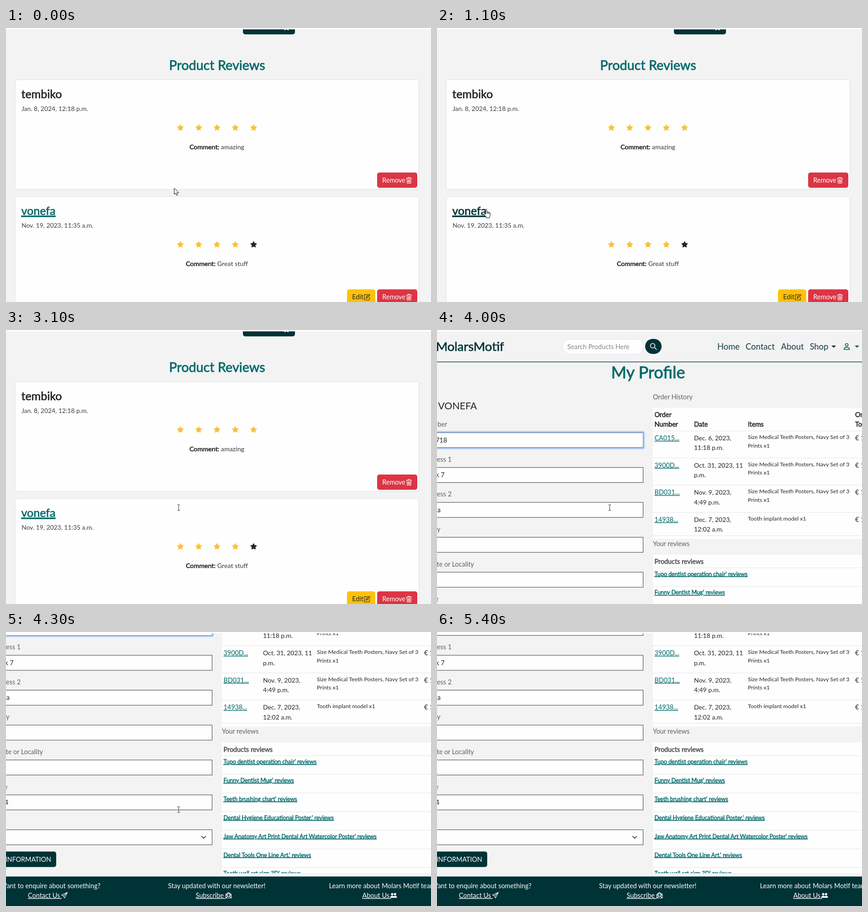
An HTML page for the animation above (5.5 s loop, 931x601 px).

```html
<!DOCTYPE html>
<html lang="en">
<head>
<meta charset="utf-8">
<title>Reviews and profile</title>
<style>
  html, body { margin: 0; width: 100%; height: 100%; overflow: hidden; background: #f3f3f3; }
  svg { display: block; width: 931px; height: 601px; }
  text { font-family: Lato, sans-serif; white-space: pre; }
  .link { text-decoration: underline; }
</style>
</head>
<body>
<svg id="stage" viewBox="0 0 931 601"></svg>
<script>
const DARK = '#003336', TEAL = '#00696a', INK = '#212529', GREY = '#5c6064', LINE = '#e1e3e5';
const BASE = 14.35, DATE = 13.9, SMALL = 12.6, ITEM = 12.35;

const text = (x, y, str, { size = BASE, fill = INK, bold = 0, anchor = 'start', link = false, id = '' } = {}) =>
  `<text x="${x}" y="${y}" font-size="${size}" fill="${fill}" text-anchor="${anchor}"` +
  (bold ? ` stroke="${fill}" stroke-width="${bold}"` : '') +
  (link ? ' class="link"' : '') + (id ? ` id="${id}"` : '') + `>${str}</text>`;
const rect = (x, y, w, h, fill, r = 0, stroke = 'none', sw = 1) =>
  `<rect x="${x}" y="${y}" width="${w}" height="${h}" rx="${r}" fill="${fill}" stroke="${stroke}" stroke-width="${sw}"/>`;
const rule = (x, y, w, color = LINE, sw = 1) => rect(x, y, w, sw, color);
const group = (x, y, inner) => `<g transform="translate(${x} ${y})">${inner}</g>`;
const outline = (d, color, sw = 1.1, fill = 'none') =>
  `<path d="${d}" fill="${fill}" stroke="${color}" stroke-width="${sw}" stroke-linecap="round" stroke-linejoin="round"/>`;

function star(cx, cy, color) {
  const points = Array.from({ length: 10 }, (_, i) => {
    const r = i % 2 ? 3.5 : 6.9, a = i * Math.PI / 5;
    return `${(cx + r * Math.sin(a)).toFixed(2)},${(cy - r * Math.cos(a)).toFixed(2)}`;
  });
  return `<polygon points="${points.join(' ')}" fill="${color}" stroke="${color}" stroke-width="1.2" stroke-linejoin="round"/>`;
}

const icon = {
  trash: outline('M1 2.5H12.5M4.5 2.5V.8H9V2.5M2 2.5L2.9 13.5H10.6L11.5 2.5M4.7 5L5 11.5M6.75 5V11.5M8.8 5L8.5 11.5', '#fff'),
  edit: outline('M8 1.5H2.2Q.8 1.5 .8 2.9V11.8Q.8 13.2 2.2 13.2H10.8Q12.2 13.2 12.2 11.8V7.5M4.5 9.5L5.2 7L11.5 .8L13.3 2.6L7 8.8Z', INK, 1.2),
  search: outline('M10.5 5.5A5 5 0 1 1 .5 5.5A5 5 0 1 1 10.5 5.5M9.2 9.2L14 14', '#fff', 1.5),
  person: outline('M9 3.2A3 3 0 1 1 3 3.2A3 3 0 1 1 9 3.2M0 13.4Q0 8.6 6 8.6Q12 8.6 12 13.4Z', TEAL, 1.7),
  plane: outline('M13.5 .5L.7 6.5L5 8.6L7 13L13.5 .5L5 8.6', '#fff'),
  mail: outline('M1 5L7 .7L13 5V13H1ZM1 13L5.5 8.5M13 13L8.5 8.5M1 5.5L7 10L13 5.5M4 6.5V3.8H10V6.5', '#fff', 1.2),
  people: '<g fill="#fff"><circle cx="4.5" cy="3" r="2.6"/><circle cx="10.8" cy="3" r="2.6"/>' +
    '<path d="M0 11Q0 6.5 4.5 6.5Q7 6.5 8 8Q9 6.5 11 6.5Q15 6.5 15 11Z"/></g>',
  caret: '<path d="M0 0H10L5 5Z"/>'
};

const button = (x, w, label, fill, color, mark) =>
  rect(x, 317, w, 33.5, fill, 5) + text(x + 11.3, 339, label, { fill: color }) + group(x + w - 25, 327, icon[mark]);

function review({ name, date, stars, comment, own }) {
  const title = own
    ? { size: 25, bold: .7, fill: TEAL, link: true, id: 'author' }
    : { size: 25, bold: .7 };
  const body = `<text x="462" y="265.5" font-size="14.3" fill="#33373b" text-anchor="middle">` +
    `<tspan fill="${INK}" stroke="${INK}" stroke-width=".6">Comment:</tspan> ${comment}</text>`;
  return rect(20, 113.5, 884.5, 240.5, '#fefefe', 5, '#dcdddf') +
    text(33.5, 153.5, name, title) +
    text(34, 182, date, { size: DATE, fill: '#3b3f43' }) +
    [0, 1, 2, 3, 4].map(i => star(382 + 40.1 * i, 218.8, i < stars ? '#fdbe38' : INK)).join('') +
    body +
    (own ? button(747, 62, 'Edit', '#ffc107', INK, 'edit') : '') +
    button(813, 88, 'Remove', '#dc3545', '#fff', 'trash');
}

function reviewsPage() {
  return rect(519, -20, 114, 34, DARK, 5) + star(614.5, -1.2, '#fff') +
    text(462.5, 92, 'Product Reviews', { size: 28.75, bold: .8, fill: TEAL, anchor: 'middle' }) +
    review({ name: 'tembiko', date: 'Jan. 8, 2024, 12:18 p.m.', stars: 5, comment: 'amazing' }) +
    group(0, 256.3, review({ name: 'vonefa', date: 'Nov. 19, 2023, 11:35 a.m.', stars: 4, comment: 'Great stuff', own: true }));
}

function navBar() {
  const items = [[614, 'Home'], [676, 'Contact'], [753.5, 'About'], [816.5, 'Shop']];
  return text(147, 46, 'MolarsMotif', { size: 27.5, bold: .7, fill: DARK, anchor: 'end' }) +
    rect(275.5, 20, 177, 33, '#fefefe', 16.5, '#e2e5e8') +
    text(285.5, 41.5, 'Search Products Here', { size: BASE, fill: '#85898d' }) +
    rect(456, 19.5, 36, 33, DARK, 16.5) + group(467, 29, icon.search) +
    items.map(([x, label]) => text(x, 43, label, { size: 18.4, fill: '#123f42' })).join('') +
    group(864, 34, `<g fill="${DARK}">${icon.caret}</g>`) +
    group(891.5, 29.3, icon.person) +
    group(915, 34, `<g fill="${TEAL}">${icon.caret}</g>`) +
    rule(0, 69.3, 931, '#185255', 1.5);
}

function form() {
  const fields = [
    ['Phone Number', 22, '718', 22], ['Street Address 1', 32, 'k 7', 16.5], ['Street Address 2', 32, 'a', 8],
    ['Town or City', 7.5, '', 0], ['County, State or Locality', 81, '', 0], ['Postcode', 3, '4', 5], ['', 0, '', 0]
  ];
  const rows = fields.map(([label, labelEnd, value, valueEnd], i) => {
    const y = 76.55 * i;
    return text(labelEnd, 212.3 + y, label, { fill: GREY, anchor: 'end' }) +
      rect(-20, 225 + y, 471.5, 33, '#fefefe', 0, '#36393c') +
      text(valueEnd, 246.8 + y, value, { anchor: 'end' });
  }).join('');
  const focus = `<g id="focus">${rect(-20, 223.2, 473.5, 36.6, 'none', 2, '#b5cdf3', 3.4)}${rect(-20, 225, 471.5, 33, 'none', 0, '#5b7fb5')}</g>`;
  return text(87.5, 173.5, 'VONEFA', { size: 21.4, anchor: 'end' }) + rows + focus +
    outline('M428.5 698.5L433 703L437.5 698.5', INK, 1.5) +
    rect(-40, 732, 150, 34, DARK, 5) +
    text(99, 754, 'UPDATE INFORMATION', { fill: '#fff', anchor: 'end' });
}

function orders() {
  const posters = ['Size Medical Teeth Posters, Navy Set of 3', 'Prints x1'];
  const rows = [
    ['CA015...', 'Dec. 6, 2023,', '11:18 p.m.', posters],
    ['3900D...', 'Oct. 31, 2023, 11', 'p.m.', posters],
    ['BD031...', 'Nov. 9, 2023,', '4:49 p.m.', posters],
    ['14938...', 'Dec. 7, 2023,', '12:02 a.m.', ['Tooth implant model x1']]
  ];
  const heads = [[476.5, 191, 'Order'], [476.5, 212.3, 'Number'], [563, 212.3, 'Date'],
    [681, 212.3, 'Items'], [916, 191, 'Order'], [916, 212.3, 'Total']];
  return text(473, 151.5, 'Order History', { fill: GREY }) +
    rect(473, 171, 458, 287, '#fefefe') +
    heads.map(([x, y, s]) => text(x, y, s, { bold: .6 })).join('') + rule(473, 221, 458) +
    rows.map(([id, day, hour, items], i) => {
      const y = 59.6 * i;
      return text(476.5, 242 + y, id, { fill: TEAL, link: true }) +
        text(563, 242 + y, day, { size: DATE }) + text(563, 263.4 + y, hour, { size: DATE }) +
        items.map((s, k) => text(681, 239 + y + 18.7 * k, s, { size: ITEM })).join('') +
        text(916, 242 + y, '€ 14.99') +
        rule(473, i < 3 ? 280.3 + y : 450.5, 458);
    }).join('');
}

function ownReviews() {
  const products = ['Tupo dentist operation chair', 'Funny Dentist Mug', 'Teeth brushing chart',
    'Dental Hygiene Educational Poster.', 'Jaw Anatomy Art Print Dental Art Watercolor Poster',
    'Dental Tools One Line Art.', 'Tooth wall art sign 3D'];
  return text(473, 473.7, 'Your reviews', { fill: GREY }) +
    rect(473, 493, 458, 286.5, '#fefefe') +
    text(476.5, 513, 'Products reviews', { fill: '#505357', bold: .6 }) + rule(473, 521.3, 458) +
    '<clipPath id="list"><rect x="473" y="493" width="458" height="286.5"/></clipPath><g clip-path="url(#list)">' +
    products.map((name, i) =>
      text(476.5, 539.5 + 40.9 * i, name + "' reviews", { size: SMALL, fill: TEAL, bold: .5, link: true }) +
      rule(473, 562.3 + 40.9 * i, 458)).join('') + '</g>';
}

function footer() {
  const white = { fill: '#fff', size: 14.45 }, link = { ...white, link: true };
  return rect(0, 786.8, 931, 70, DARK) +
    text(207, 812, 'Want to enquire about something?', { ...white, anchor: 'end' }) +
    text(355, 812, 'Stay updated with our newsletter!', white) +
    text(707.5, 812, 'Learn more about Molars Motif team!', white) +
    text(48, 833.3, 'Contact Us ', link) + group(121, 821, icon.plane) +
    text(415.5, 833.3, 'Subscribe ', link) + group(480.5, 821, icon.mail) +
    text(780.5, 833.3, 'About Us ', link) + group(841.5, 822.5, icon.people);
}

const pointers = {
  arrow: outline('M.5 .5V13.8L3.5 11L5.5 16L8 15L6 10.2H10Z', '#111', 1, '#fff'),
  hand: outline('M4.5 12V2Q4.5 .5 5.8 .5Q7.2 .5 7.2 2V7Q9.5 6 9.9 7.6Q12 6.8 12.4 8.4Q14.6 8 14.6 10V14Q14.6 16 13.2 17.5V20H5.8V18L1 12.6Q.2 10.8 2 10.4Q3 10.4 4.5 12M7.2 7V10.5M9.9 7.6V11M12.4 8.4V11.2', '#111', 1, '#fff'),
  beam: outline('M-2.5 -6.5Q0 -6.5 0 -5Q0 -6.5 2.5 -6.5M0 -5V5M-2.5 6.5Q0 6.5 0 5Q0 6.5 2.5 6.5', '#444', 1.1)
};

const stage = document.getElementById('stage');
stage.innerHTML = rect(0, 0, 931, 601, '#f3f3f3') +
  `<g id="reviews">${reviewsPage()}</g>` +
  `<g id="profile">${navBar()}${text(462.5, 106, 'My Profile', { size: 36.1, bold: .9, fill: TEAL, anchor: 'middle' })}` +
  `${form()}${orders()}${ownReviews()}${footer()}</g>` +
  rect(0, 0, 931, 3, '#fefefe') +
  Object.entries(pointers).map(([k, d]) => `<g id="${k}">${d}</g>`).join('');

const $ = id => document.getElementById(id);
const show = (id, on) => $(id).setAttribute('visibility', on ? 'visible' : 'hidden');
const LOOP = 5500, STEP = 100;
const scrollSteps = [[0, 0], [4100, 160], [4200, 239], [4300, 250.5]];
const focusSteps = [[0, 1], [5300, .4], [5400, 0]];
const valueAt = (steps, t) => steps.filter(([at]) => at <= t).pop()[1];

function pointerAt(t) {
  if (t < 1000) {
    const p = t / 1000, e = p * p * (3 - 2 * p);
    const x = 368 - 266 * e, y = 351 + 46 * e;
    return e > .95 ? ['hand', x, y] : y > 384 ? ['beam', x, y] : ['arrow', x, y];
  }
  if (t < 2500) return ['hand', 102, 396.5];
  if (t < 2600) return ['arrow', 300, 317];
  return t < 4700 ? ['beam', 378.3, 389.5] : [''];
}

function draw(now) {
  const t = Math.floor(now % LOOP / STEP) * STEP;
  const onProfile = t >= 3200;
  show('reviews', !onProfile);
  show('profile', onProfile);
  $('profile').setAttribute('transform', `translate(0 ${-valueAt(scrollSteps, t)})`);
  $('focus').setAttribute('opacity', valueAt(focusSteps, t));

  const [kind, x, y] = pointerAt(t);
  for (const name in pointers) show(name, name === kind);
  if (kind) $(kind).setAttribute('transform', `translate(${x} ${y})`);

  const color = kind === 'hand' ? DARK : TEAL;
  $('author').setAttribute('fill', color);
  $('author').setAttribute('stroke', color);
}

const start = performance.now();
function tick() {
  draw(performance.now() - start);
  requestAnimationFrame(tick);
}
tick();
</script>
</body>
</html>
```
